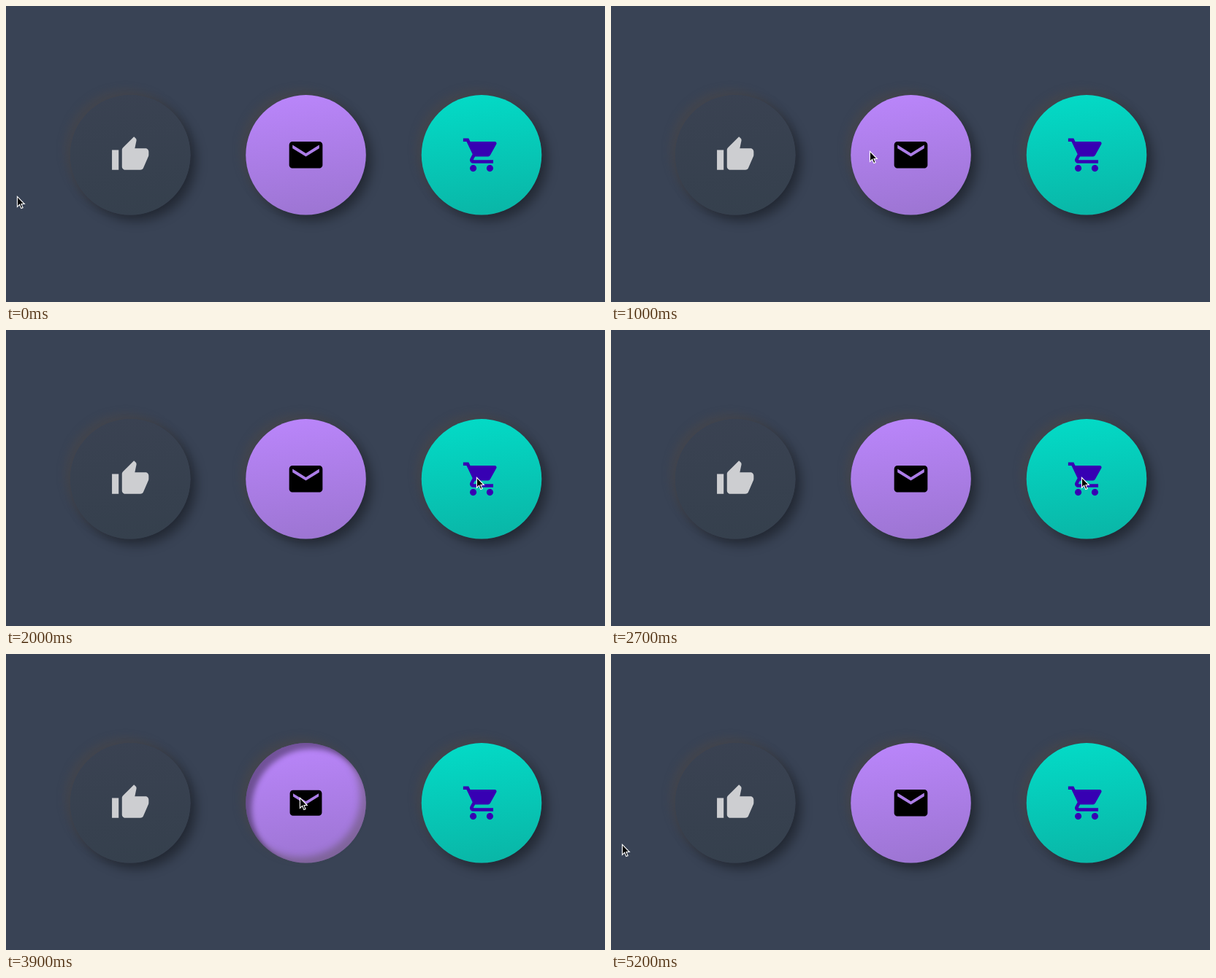
Animation of 820x406 px, one loop 5300 ms. Source, as an HTML page:

```html
<!DOCTYPE html>
<html lang="en">
<head>
<meta charset="utf-8">
<title>Soft buttons</title>
<style>
  html, body { margin: 0; width: 100%; height: 100%; overflow: hidden; background: #394355; }
  .stage { position: relative; width: 820px; height: 406px; overflow: hidden; }
  .button {
    --glow: rgba(80, 72, 68, .4);
    --shade: rgba(0, 0, 0, .38);
    position: absolute; left: 0; top: 0; width: 165px; height: 165px; border-radius: 50%;
    transform: translate(var(--x), 121.8px) scale(.997);
    background: linear-gradient(172deg, var(--from), var(--to));
    box-shadow: -7px -7px 12px var(--glow), 8px 8px 15px var(--shade);
  }
  .button.pressed {
    box-shadow: -7px -7px 12px var(--glow),
      inset 8px 8px 8px var(--shade), inset -8px -8px 10px var(--glow);
  }
  .like { --x: 87.7px; --from: #3a4252; --to: #35404d; fill: #cdced1; }
  .mail { --x: 328px; --from: #bb86fc; --to: #9b74d0; fill: #000; }
  .cart { --x: 568.5px; --from: #03dcc8; --to: #0ab4a5; fill: #3700b3; }
  .like.pressed { --from: #394254; --to: #384251; }
  .button svg { position: absolute; left: 55px; top: 55px; width: 55px; height: 55px; }
  .pressed svg { transform: scale(.96); }
  .cursor { position: absolute; left: 0; top: 0; overflow: visible; width: 12px; height: 18px; }
</style>
</head>
<body>
<div class="stage">
  <div class="button like"><svg viewBox="0 0 24 24"><path d="M1 21h4V9H1v12zm22-11c0-1.1-.9-2-2-2h-6.31l.95-4.57.03-.32c0-.41-.17-.79-.44-1.06L14.17 1 7.59 7.59C7.22 7.95 7 8.45 7 9v10c0 1.1.9 2 2 2h9c.83 0 1.54-.5 1.84-1.22l3.02-7.05c.09-.23.14-.47.14-.73v-2z"/></svg></div>
  <div class="button mail"><svg viewBox="0 0 24 24"><path d="M20 4H4c-1.1 0-1.99.9-1.99 2L2 18c0 1.1.9 2 2 2h16c1.1 0 2-.9 2-2V6c0-1.1-.9-2-2-2zm0 4l-8 5-8-5V6l8 5 8-5v2z"/></svg></div>
  <div class="button cart"><svg viewBox="0 0 24 24"><path d="M7 18c-1.1 0-1.99.9-1.99 2S5.9 22 7 22s2-.9 2-2-.9-2-2-2zM1 2v2h2l3.6 7.59-1.35 2.45c-.16.28-.25.61-.25.96 0 1.1.9 2 2 2h12v-2H7.42c-.14 0-.25-.11-.25-.25l.03-.12.9-1.63h7.45c.75 0 1.41-.41 1.75-1.03l3.58-6.49c.08-.14.12-.31.12-.48 0-.55-.45-1-1-1H5.21l-.94-2H1zm16 16c-1.1 0-1.99.9-1.99 2s.89 2 1.99 2 2-.9 2-2-.9-2-2-2z"/></svg></div>
  <svg class="cursor"><path d="M.4.4V14.4L3.6 11.3 5.8 16.6 8.1 15.6 5.9 10.5H10.3Z" fill="#000" stroke="#fff" stroke-width="1.1"/></svg>
</div>
<script>
  const LOOP = 5300, STEP = 100, HOLD = 300;

  const spots = {
    home: { x: 15, y: 261 },
    like: { x: 162, y: 209 },
    mail: { x: 402, y: 197 },
    cart: { x: 644, y: 202 }
  };

  const moves = [
    { to: 'like', start: 50, end: 400 },
    { to: 'mail', start: 800, end: 1080 },
    { to: 'cart', start: 1600, end: 2000 },
    { to: 'mail', start: 3320, end: 3720 },
    { to: 'like', start: 4000, end: 4400 },
    { to: 'home', start: 4800, end: 5200 }
  ];

  const pressTimes = { like: [600, 4400], mail: [1200, 3700], cart: [2200, 2800] };

  const cursor = document.querySelector('.cursor');
  const smooth = u => u * u * (3 - 2 * u);
  const progress = (t, { start, end }) =>
    smooth(Math.min(1, Math.max(0, (t - start) / (end - start))));

  function cursorAt(t) {
    let { x, y } = spots.home;
    for (const move of moves) {
      const k = progress(t, move), goal = spots[move.to];
      x += (goal.x - x) * k;
      y += (goal.y - y) * k;
    }
    return [Math.round(x), Math.round(y)];
  }

  function draw() {
    const t = Math.floor(performance.now() % LOOP / STEP) * STEP;
    const [x, y] = cursorAt(t);
    cursor.style.transform = `translate(${x}px, ${y}px)`;
    for (const [name, times] of Object.entries(pressTimes)) {
      const pressed = times.some(start => t >= start && t < start + HOLD);
      document.querySelector('.' + name).classList.toggle('pressed', pressed);
    }
    requestAnimationFrame(draw);
  }
  draw();
</script>
</body>
</html>
```
